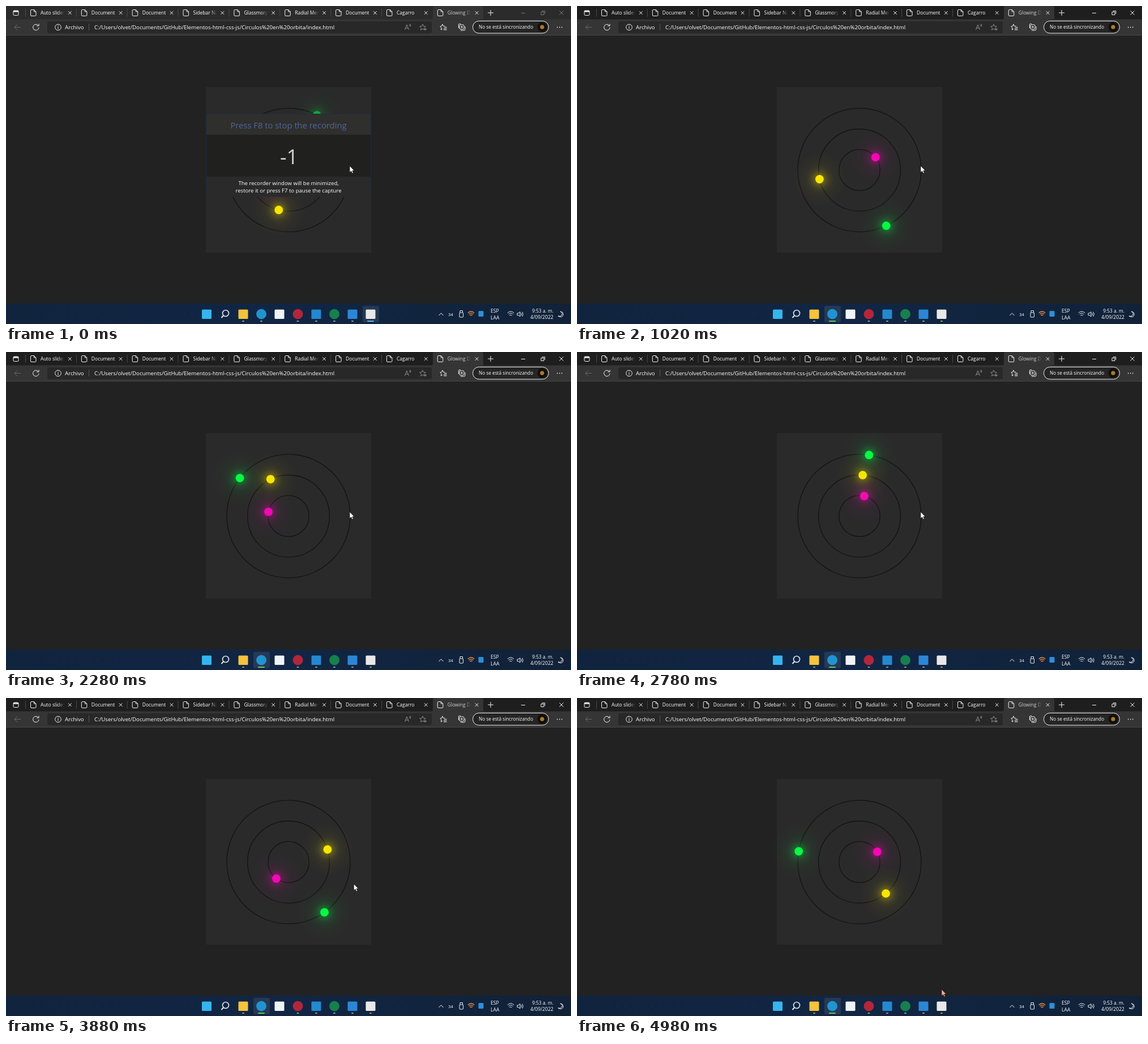
An HTML page for the animation above (5.03 s loop, 998x561 px).

```html
<!DOCTYPE html>
<html lang="es">
<head>
<meta charset="utf-8">
<title>Glowing Dots</title>
<style>
html, body { margin: 0; width: 100%; height: 100%; overflow: hidden; background: #222; }
svg { display: block; width: 998px; height: 561px; font-family: "Open Sans", "Noto Sans", sans-serif; }
.line { fill: none; stroke: #f2f2f2; stroke-width: 1; }
.dim { stroke: #8c8c8c; }
</style>
</head>
<body>
<svg id="stage" viewBox="0 0 998 561">
  <defs>
    <linearGradient id="bar"><stop offset="0" stop-color="#10243e"/><stop offset=".5" stop-color="#112644"/><stop offset="1" stop-color="#112238"/></linearGradient>
    <linearGradient id="fade"><stop offset=".72" stop-color="#fff"/><stop offset="1" stop-color="#000"/></linearGradient>
    <linearGradient id="tint" x2="0" y2="1"><stop offset=".3" stop-color="#f59ad2"/><stop offset="1" stop-color="#f0c23c"/></linearGradient>
    <mask id="cut" maskContentUnits="userSpaceOnUse" x="0" y="-12" width="42" height="20" maskUnits="userSpaceOnUse"><rect y="-12" width="42" height="20" fill="url(#fade)"/></mask>
  </defs>

  <rect width="998" height="561" fill="#222"/>
  <rect x="353" y="143" width="292" height="292" fill="#2a2a2a"/>
  <g id="orbits" fill="none" stroke="#131313" stroke-width="1.3"></g>
  <g id="dots"></g>

  <g id="notice">
    <rect x="353.5" y="190.5" width="291" height="146" fill="#2a2a2a"/>
    <rect x="353" y="190" width="292" height="37" fill="#2f2f2e"/>
    <rect x="353" y="227" width="292" height="74" fill="#20201e"/>
    <path d="M353.5 336V190.5H644.5V336" fill="none" stroke="#1f2a42"/>
    <g text-anchor="middle" fill="#fff" font-size="9.6">
      <text x="499" y="215.5" font-size="14.8" fill="#50679a">Press F8 to stop the recording</text>
      <text x="500" y="279.2" font-size="36" fill="#d0d0d0">-1</text>
      <text x="499" y="315.5">The recorder window will be minimized,</text>
      <text x="499" y="328.5">restore it or press F7 to pause the capture</text>
    </g>
  </g>

  <rect id="title" width="998" height="24"/>
  <path d="M751 24Q754 24 754 21V3Q754 0 757 0H840Q843 0 843 3V21Q843 24 846 24Z" fill="#353535"/>
  <rect y="23.5" width="998" height="28" fill="#353535"/>
  <rect y="51" width="998" height="1" fill="#484848"/>
  <rect x="73" y="27" width="679" height="21" rx="3" fill="#282828"/>
  <g id="tabs" font-size="8.5" font-weight="500"></g>
  <g class="line">
    <rect x="13" y="8" width="9" height="8.5" rx="1.5"/><path d="M13 9.5H22" stroke-width="2.4"/>
    <path d="M856 7V17M851 12H861"/>
    <path id="controls" d="M910 12.5H917M945 10.5H950V15.5H945ZM946.7 8.7H951.8V13.8M977.5 8.5L984.5 15.5M984.5 8.5L977.5 15.5"/>
    <path class="dim" d="M26 37.5H15M20 32.5L15 37.5L20 42.5" opacity=".6"/>
    <path d="M57 34.5A5.2 5.2 0 1 0 58 38M58 31.5V35H54.4"/>
    <circle cx="92" cy="37.5" r="5.3"/><path d="M92 36.5V40.5M92 34.3V35.5"/>
    <path d="M146.5 31V43" stroke="#555"/>
    <path class="dim" d="M704.5 42L708 33L711.5 42M705.8 39H710.2M712.5 32.5Q714 34 712.5 35.5M714 31.5Q716 34 714 36.5"/>
    <path class="dim" d="M736 32L737.6 35.6L741.4 36L738.6 38.6L739.4 42.4L736 40.4L732.6 42.4L733.4 38.6L730.6 36L734.4 35.6Z"/>
    <path class="dim" d="M739 41H743M741 39V43"/>
    <path d="M771 32L772.4 35.5H775.5M771 32L769.6 35.5L766.8 36L769 38.5L768.4 42L771 40.4M774 37.5H778.5M773 39.8H778.5M773 42H778.5"/>
    <rect x="801" y="33" width="8" height="8" rx="2"/><path d="M803 31.5H800.5Q799.5 31.5 799.5 33V39M811 36V41Q811 43 809 43H803M805 35V39M803 37H807"/>
    <rect x="824.5" y="26.5" width="134" height="21.5" rx="10.7" fill="#252525"/>
    <path d="M973 37.5H974.5M977 37.5H978.5M981 37.5H982.5" stroke-width="1.5"/>
  </g>
  <circle cx="947" cy="37.2" r="8.4" fill="#120e08"/>
  <circle cx="947" cy="37.2" r="3.6" fill="#a87b2d"/>
  <g fill="#fff">
    <text x="104" y="41" font-size="9.7">Archivo</text>
    <text x="156" y="41" font-size="9.7">C:/Users/olvet/Documents/GitHub/Elementos-html-css-js/Circulos%20en%20orbita/index.html</text>
    <text x="835" y="40.2" font-size="8.25">No se está sincronizando</text>
  </g>

  <rect y="525" width="998" height="36" fill="url(#bar)"/>
  <rect id="focus" y="529" width="29" height="29" rx="3" fill="#fff" opacity=".09"/>
  <g id="apps"></g>
  <g class="line">
    <circle cx="388" cy="542" r="5.5" stroke="#dce3ea" stroke-width="1.7"/>
    <path d="M384 546L380.5 550" stroke="#dce3ea" stroke-width="2"/>
    <path d="M764.5 546L768.5 541.8L772.5 546"/>
    <rect x="801" y="541" width="6.5" height="8" rx="1"/><path d="M802 541V537.5H806.5V541"/>
    <path d="M815.8 541.5Q821.5 536 827.2 541.5M817.7 543.8Q821.5 540 825.3 543.8M819.5 546Q821.5 544 823.5 546" stroke="#e58a45" stroke-width="1.3"/>
    <path d="M885.8 541.5Q891.5 536 897.2 541.5M887.7 543.8Q891.5 540 895.3 543.8M889.5 546Q891.5 544 893.5 546"/>
    <path d="M903 542V545.5H905L908 548V539.5L905 542ZM910 541.5Q911.5 543.7 910 546M912 539.7Q914.5 543.7 912 547.7"/>
    <path d="M979 539Q983.5 540.5 982 545Q979.5 548.5 975 547Q982 551 984.2 545Q984.8 539.5 979 539Z"/>
  </g>
  <rect x="834.5" y="538" width="9" height="10" rx="1.5" fill="#2e8fd8"/>
  <g fill="#fff" font-size="8.6" font-weight="500">
    <text x="781" y="546.5" font-size="7.8">34</text>
    <text x="856" y="541">ESP</text><text x="856" y="553">LAA</text>
    <g text-anchor="end"><text x="967" y="541" font-size="8.4">9:53 a. m.</text><text x="967" y="552">4/09/2022</text></g>
  </g>
  <path id="cursor" d="M0 0V11.6L2.7 9.2L4.6 13.2L6.5 12.3L4.7 8.4H8.2Z" stroke="#111" stroke-width=".7"/>
</svg>
<script>
const NS = 'http://www.w3.org/2000/svg';
const LOOP = 5030, CX = 499, CY = 289.4;
const $ = id => document.getElementById(id);

function add(parent, tag, attrs, text) {
  const el = document.createElementNS(NS, tag);
  for (const k in attrs) el.setAttribute(k, attrs[k]);
  if (text) el.textContent = text;
  parent.appendChild(el);
  return el;
}

// Browser tabs, about 90px apart
['Auto slideshow', 'Document', 'Document', 'Sidebar Navigation', 'Glassmorphism', 'Radial Menu', 'Document', 'Cagarro', 'Glowing Dots']
  .forEach((title, i) => {
    const tab = add($('tabs'), 'g', { transform: `translate(${i * 89.85} 0)` });
    if (i < 8) add(tab, 'path', { d: 'M34.5 5V19', stroke: '#4a4a4a' });
    add(tab, 'path', { class: 'line', d: 'M45 6.5H49.5L53 10V16Q53 17.5 51.5 17.5H45Q43.5 17.5 43.5 16V8Q43.5 6.5 45 6.5ZM49.5 6.5V10H53' });
    const box = add(tab, 'g', { transform: 'translate(61 15)' });
    const label = add(box, 'text', { fill: i < 8 ? '#fff' : '#d0d0d0' }, title);
    if (title.length > 8) label.setAttribute('mask', 'url(#cut)');
    add(tab, 'path', { class: 'line', d: 'M110 9.3L115.6 14.9M115.6 9.3L110 14.9' });
  });

// Taskbar: centre, colour, shape, has a running mark
const apps = [
  [354.5, '#35b5ee', 'square', 0], [419, '#f6c33c', 'square', 1], [451, '#2193d1', 'circle', 1],
  [483, '#f0f3f5', 'square', 0], [515.5, '#b3263a', 'circle', 1], [548, '#2489d0', 'square', 1],
  [580, '#16804f', 'circle', 1], [612, '#2b87d6', 'square', 1], [644, '#e8e8e8', 'square', 1]
];
const marks = {};
for (const [x, fill, shape, runs] of apps) {
  if (shape === 'circle') add($('apps'), 'circle', { cx: x, cy: 543.5, r: 9, fill });
  else add($('apps'), 'rect', { x: x - 8.5, y: 535.5, width: 17, height: 16.5, rx: 1.5, fill });
  if (runs) marks[x] = add($('apps'), 'rect', { y: 555, height: 2, rx: 1 });
}

function mark(x, width, fill) {
  const m = marks[x];
  m.setAttribute('x', x - width / 2);
  m.setAttribute('width', width);
  m.setAttribute('fill', fill);
}

// Orbits: radius, colour, speed relative to the outer dot, start offset in degrees
const dots = [
  [36.2, '#f507b5', 1.5, -135], [72.4, '#f9e600', .5, 135], [109, '#04fb43', 1, 0]
].map(([r, color, speed, shift], i) => {
  add($('orbits'), 'circle', { cx: CX, cy: CY, r });
  const grad = add(document.querySelector('defs'), 'radialGradient', { id: 'glow' + i });
  [[.14, .32], [.24, .2], [.36, .1], [.5, .045], [.7, .02], [1, 0]].forEach(([offset, a]) =>
    add(grad, 'stop', { offset, 'stop-color': color, 'stop-opacity': a }));
  const el = add($('dots'), 'g', {});
  add(el, 'circle', { r: 48, fill: `url(#glow${i})` });
  add(el, 'circle', { r: 7.4, fill: color });
  return { el, r, speed, shift };
});

// Time and angle of the outer dot
const turn = [[0, -62.5], [1020, 64.3], [1780, 157], [2780, 278.9], [3430, 359.1], [4330, 469.7], [4980, 550], [5030, 556.2]];

function lerpKeys(keys, t) {
  let i = 1;
  while (i < keys.length - 1 && t > keys[i][0]) i++;
  const [t0, a] = keys[i - 1], [t1, b] = keys[i];
  return a + (b - a) * (t - t0) / (t1 - t0);
}

function snap(t) {
  const step = (from, max) => Math.min(max, from + Math.floor((t - from) / 50) * 50);
  return t < 570 ? step(0, 500) : t < 1680 ? step(570, 1620) : step(1680, 4980);
}

function draw(time) {
  const t = snap(time % LOOP);
  const angle = lerpKeys(turn, t);
  const intro = t < 50;

  dots.forEach(({ el, r, speed, shift }, i) => {
    const a = (angle * speed + shift) * Math.PI / 180;
    el.setAttribute('transform', `translate(${CX + r * Math.cos(a)} ${CY + r * Math.sin(a)})`);
    el.setAttribute('opacity', intro && i === 2 ? .6 : 1);
  });

  // The browser is inactive while the notice is up
  $('notice').style.display = intro ? '' : 'none';
  $('title').setAttribute('fill', intro ? '#2b2b2b' : '#1e1e1e');
  $('controls').style.stroke = intro ? '#777' : '#f2f2f2';
  $('focus').setAttribute('x', intro ? 630 : 437);
  for (const x in marks) mark(+x, 4, '#9a9a8c');
  if (intro) mark(644, 12, '#58b7e8');
  else {
    mark(451, 12, '#62c864');
    mark(644, 4, '#a99a3c');
  }

  const p = Math.max(0, Math.min(1, (t - 3780) / 350));
  const e = p * p * (3 - 2 * p);
  $('cursor').setAttribute('transform', `translate(${607 + 37 * e} ${282 + 232 * e})`);
  $('cursor').setAttribute('fill', p < 1 ? '#fff' : 'url(#tint)');
}

function loop() {
  draw(performance.now());
  requestAnimationFrame(loop);
}
loop();
</script>
</body>
</html>
```
